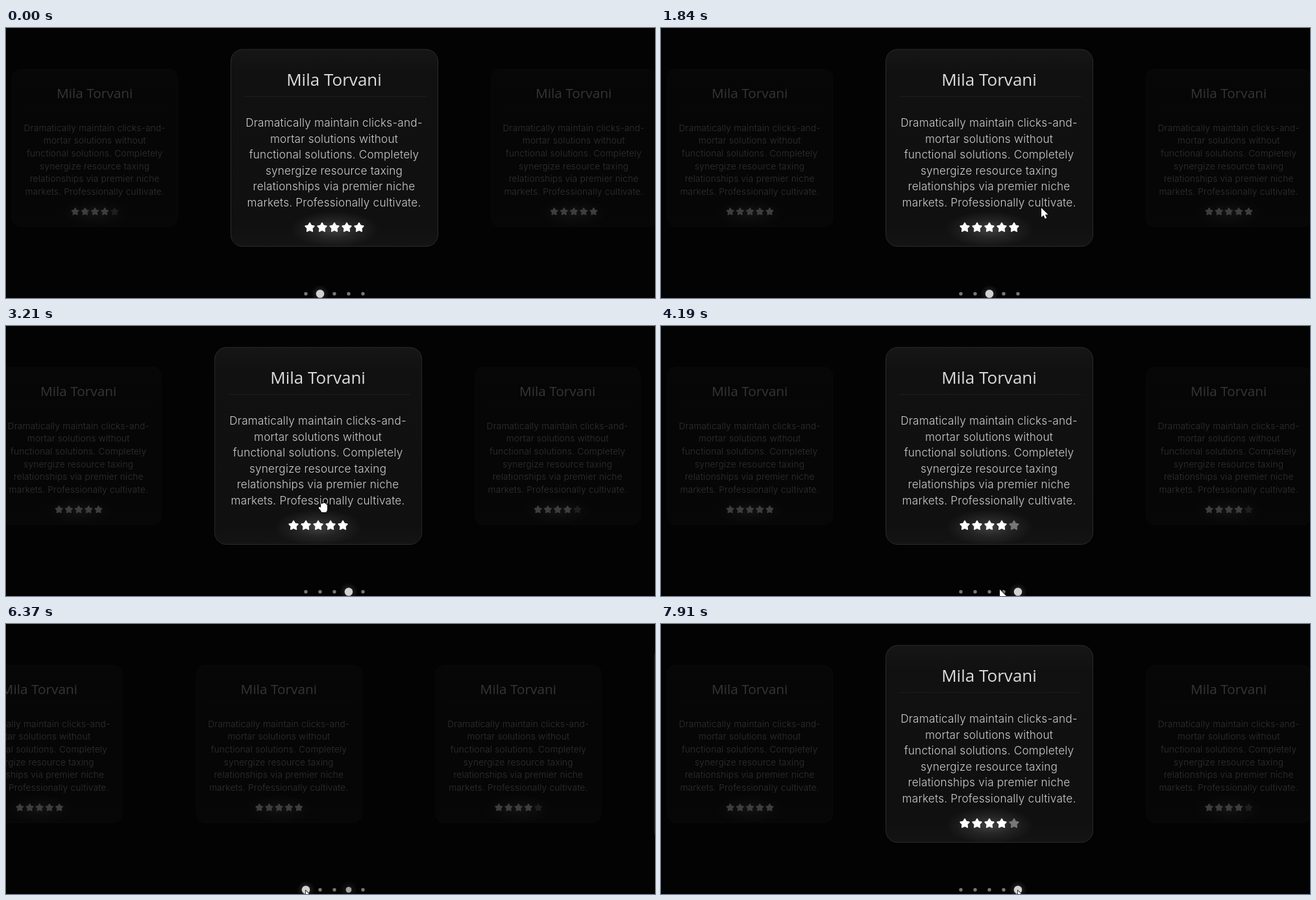
An HTML page with a canvas that plays this animation: 1000 px wide and 416 px high, repeating every 7990 ms.

```html
<!DOCTYPE html>
<html lang="en">
<head>
<meta charset="utf-8">
<title>Testimonial carousel</title>
<style>
  html, body { margin: 0; width: 100%; height: 100%; overflow: hidden; background: #030303; }
  canvas { display: block; }
</style>
</head>
<body>
<canvas id="stage" width="1000" height="416"></canvas>
<script>
const ctx = document.getElementById('stage').getContext('2d');
const LOOP = 7990, COUNT = 5;
const MID = 506, STEP = 369, DIM = 0.23, BACK = 3;
const SLIDE = 700, GLIDE = 400, HOVER = 260, LEAD = 150;
const DRAG = { at: 3100, time: 230, reach: 0.29 };
const NAME = 'Mila Torvani';
const LINES = [
  'Dramatically maintain clicks-and-', 'mortar solutions without',
  'functional solutions. Completely', 'synergize resource taxing',
  'relationships via premier niche', 'markets. Professionally cultivate.'
];

// Each slide moves the track to a card; the count runs on past the last one.
const slides = [
  { at: -1000, to: 1 },
  { at: 60, to: 2 },
  { at: 2270, to: 3 },
  { at: DRAG.at + DRAG.time, to: 4, from: 3 + DRAG.reach },
  { at: 4760, to: 3, click: true },
  { at: 6292, to: 5, click: true },
  { at: 7180, to: 4, click: true }
];

const dotX = i => 462 + i % COUNT * 22;
const rating = k => k % COUNT % 4 ? 5 : 4;
const clamp = v => Math.min(1, Math.max(0, v));
const mix = (a, b, p) => a + (b - a) * p;
const grey = v => `rgb(${v},${v},${v})`;

// CSS "ease": cubic-bezier(.25, .1, .25, 1)
function ease(p) {
  p = clamp(p);
  let lo = 0, hi = 1;
  for (let i = 0; i < 20; i++) {
    const t = (lo + hi) / 2;
    if (0.75 * t * (1 - t) + t ** 3 < p) lo = t; else hi = t;
  }
  return 0.3 * lo * (1 - lo) ** 2 + 3 * lo * lo * (1 - lo) + lo ** 3;
}

const dragged = t => DRAG.reach * clamp((t - DRAG.at) / DRAG.time) ** 2;
const dragging = t => t >= DRAG.at && t < DRAG.at + DRAG.time;

function track(t) {
  const n = slides.findLastIndex(s => t >= s.at);
  const { at, to, from = slides[n - 1]?.to ?? to } = slides[n];
  const pos = mix(from, to, ease((t - at) / SLIDE));
  return { active: to, pos: dragging(t) ? pos + dragged(t) : pos };
}

function star(x, y) {
  ctx.beginPath();
  for (let i = 0; i < 10; i++) {
    const a = i * Math.PI / 5 - Math.PI / 2, r = i % 2 ? 3.7 : 7;
    ctx.lineTo(x + r * Math.cos(a), y + r * Math.sin(a));
  }
  ctx.closePath();
  ctx.fill();
  ctx.stroke();
}

function glow(x, y, rx, ry, alpha) {
  ctx.save();
  ctx.translate(x, y);
  ctx.scale(rx, ry);
  const g = ctx.createRadialGradient(0, 0, 0, 0, 0, 1);
  g.addColorStop(0, `rgba(255,255,255,${alpha})`);
  g.addColorStop(0.5, `rgba(255,255,255,${alpha * 0.4})`);
  g.addColorStop(1, 'rgba(255,255,255,0)');
  ctx.fillStyle = g;
  ctx.fillRect(-1, -1, 2, 2);
  ctx.restore();
}

function card(x, stars, bright) {
  const light = bright ? 1 : DIM;
  const shade = v => grey(mix(BACK, v, light));
  ctx.save();
  ctx.translate(x, 185);
  if (!bright) ctx.scale(0.8, 0.8);
  ctx.translate(0, -185);

  const g = ctx.createLinearGradient(0, 33, 0, 337);
  g.addColorStop(0, shade(22));
  g.addColorStop(0.12, shade(17));
  g.addColorStop(0.9, shade(16));
  g.addColorStop(1, shade(20));
  ctx.beginPath();
  ctx.roundRect(-159.5, 33, 319, 303.5, 18);
  ctx.fillStyle = g;
  ctx.fill();
  ctx.strokeStyle = shade(43);
  ctx.lineWidth = 1;
  ctx.stroke();
  ctx.fillStyle = shade(29);
  ctx.fillRect(-140, 105, 282, 1);

  ctx.textAlign = 'center';
  ctx.fillStyle = shade(220);
  ctx.font = '26px "Open Sans", "Noto Sans", sans-serif';
  ctx.letterSpacing = '0px';
  ctx.fillText(NAME, -0.5, 88.5);
  ctx.fillStyle = shade(205);
  ctx.font = '300 17.2px Inter, sans-serif';
  ctx.letterSpacing = '0.2px';
  LINES.forEach((line, i) => ctx.fillText(line, -0.5, 152 + i * 24.6));

  glow(0, 310, 68, 28, 0.2 * light);
  ctx.lineJoin = 'round';
  ctx.lineWidth = 2;
  for (let i = 0; i < 5; i++) {
    ctx.fillStyle = ctx.strokeStyle = shade(i < stars ? 255 : 119);
    star((i - 2) * 19, 307.5);
  }
  ctx.restore();
}

// A dot swells when hovered or active and shrinks at the next slide.
function dot(i, t) {
  let size = 0;
  slides.forEach(({ at, to, click }, n) => {
    if (to % COUNT !== i) return;
    const on = click ? at - LEAD : at, off = slides[n + 1]?.at ?? LOOP;
    size = Math.max(size, ease((t - on) / HOVER) - ease((t - off) / HOVER));
  });
  glow(dotX(i), 409.5, 14, 14, 0.22 * size);
  ctx.fillStyle = grey(mix(118, 210, size));
  ctx.beginPath();
  ctx.arc(dotX(i), 409.5, mix(2.7, 6.3, size), 0, 7);
  ctx.fill();
}

const ARROW = new Path2D('M0 0V14.5L3.4 11.4L5.8 16.8L8.3 15.7L5.9 10.5H10.5Z');
const FIST = new Path2D('M-3 2Q-2-1 0 1Q1-2 2 0Q4-1 5 2Q7 1 7 4V9Q7 12 5 14H-2Q-2 12-6 8Q-7 5-4 6L-3 7Z');

// Places where the pointer comes to rest, with its time of arrival
const stops = [
  { at: 1730, x: 586, y: 277 },
  { at: DRAG.at, x: 513, y: 273 },
  { at: 4190, x: 522, y: 406 },
  ...slides.filter(s => s.click).map(s => ({ at: s.at - LEAD, x: dotX(s.to), y: 411 }))
];

function pointer(t) {
  let x = dotX(1), y = 430;
  for (const stop of stops) {
    const p = ease((t - stop.at) / GLIDE + 1);
    x = mix(x, stop.x, p);
    y = mix(y, stop.y, p);
    if (stop.at === DRAG.at) x -= STEP * dragged(t);
  }
  const shape = dragging(t) ? FIST : ARROW;
  ctx.save();
  ctx.translate(x, y);
  ctx.strokeStyle = '#000';
  ctx.lineWidth = 1.5;
  ctx.stroke(shape);
  ctx.fillStyle = '#fff';
  ctx.fill(shape);
  ctx.restore();
}

function draw(t) {
  ctx.fillStyle = grey(BACK);
  ctx.fillRect(0, 0, 1000, 416);
  const { pos, active } = track(t);
  for (let k = Math.floor(pos) - 2; k <= pos + 3; k++) {
    card(MID + (k - pos) * STEP, rating(k + COUNT), k === active);
  }
  for (let i = 0; i < COUNT; i++) dot(i, t);
  pointer(t);
}

const begin = performance.now();
function tick() {
  draw((performance.now() - begin) % LOOP);
  requestAnimationFrame(tick);
}
tick();
</script>
</body>
</html>
```
